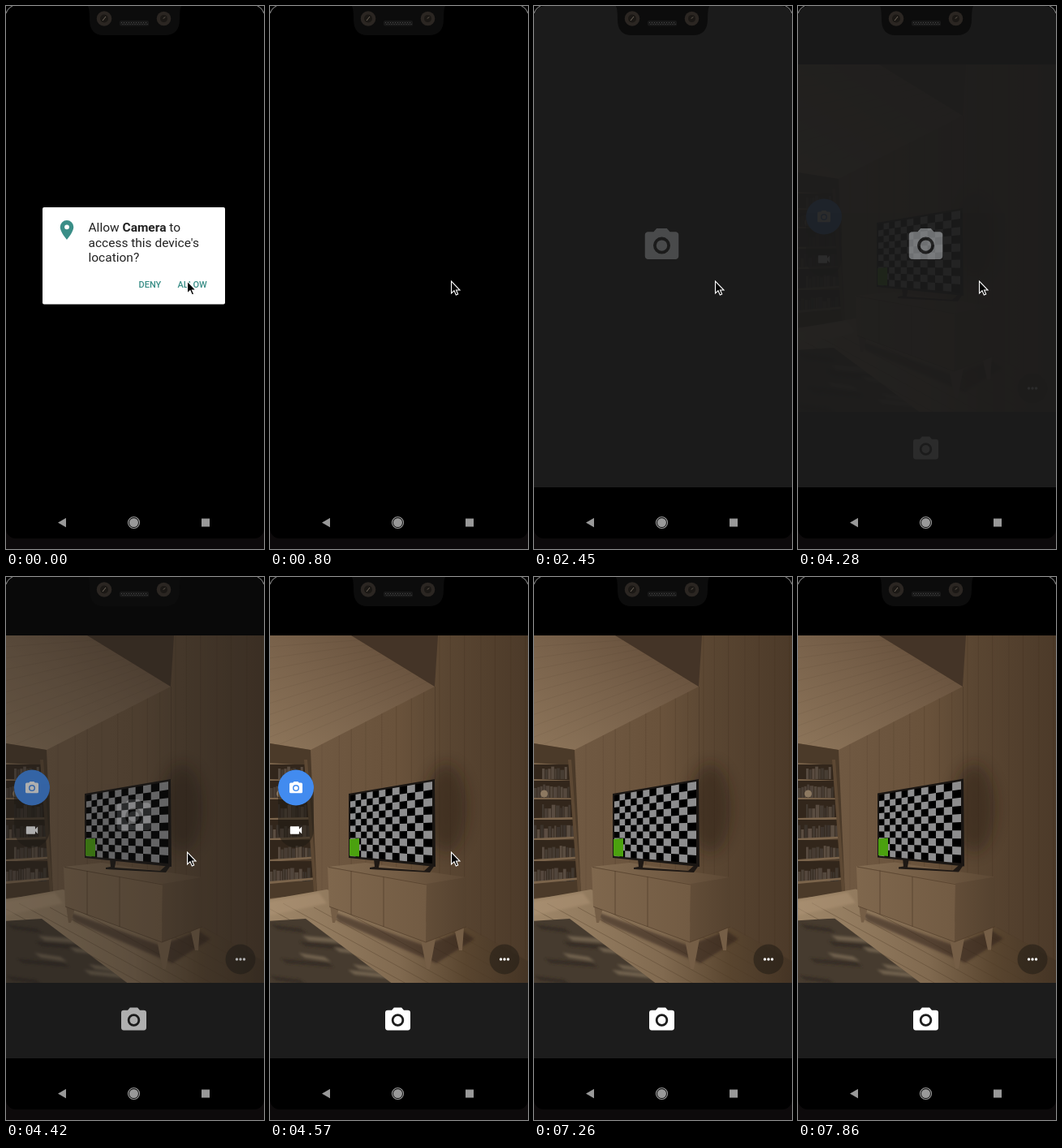
An HTML page for the animation above (8 s loop, 318 by 669 pixels).

```html
<!DOCTYPE html>
<html lang="en">
<head>
<meta charset="utf-8">
<title>Camera permission</title>
<style>
  html, body { margin: 0; width: 100%; height: 100%; overflow: hidden; background: #000; }
  svg { display: block; width: 100vw; height: 100vh; }
  text { font-family: Roboto, sans-serif; }
  .question { font-size: 15.5px; fill: #222; }
  .action { font-size: 11px; font-weight: 500; fill: #3a8e87; }
</style>
</head>
<body>
<svg viewBox="0 0 318 669">
  <defs>
    <symbol id="camera" viewBox="2 2 20 18">
      <path fill-rule="evenodd" d="M9 2 7.2 4H4a2 2 0 0 0-2 2v12a2 2 0 0 0 2 2h16a2 2 0 0 0 2-2V6a2 2 0 0 0-2-2h-3.2L15 2zM12 7a5 5 0 1 1 0 10 5 5 0 1 1 0-10z"/>
      <circle cx="12" cy="12" r="3.2"/>
    </symbol>
    <linearGradient id="wallShade">
      <stop offset=".15" stop-color="#705942"/><stop offset=".5" stop-color="#69523b"/>
      <stop offset=".68" stop-color="#5a4632"/><stop offset="1" stop-color="#4c3a29"/>
    </linearGradient>
    <linearGradient id="ceilingShade" x1="0" y1="1" x2="1" y2="0">
      <stop offset="0" stop-color="#8d755a"/><stop offset=".5" stop-color="#78614a"/><stop offset="1" stop-color="#604a37"/>
    </linearGradient>
    <linearGradient id="floorShade">
      <stop offset="0" stop-color="#a0886a"/><stop offset=".5" stop-color="#816a50"/>
      <stop offset=".75" stop-color="#59452f"/><stop offset="1" stop-color="#433324"/>
    </linearGradient>
    <linearGradient id="topShade">
      <stop offset="0" stop-color="#826b51"/><stop offset=".5" stop-color="#745d45"/><stop offset="1" stop-color="#5c4834"/>
    </linearGradient>
    <linearGradient id="frontShade">
      <stop offset="0" stop-color="#7f674d"/><stop offset="1" stop-color="#725b43"/>
    </linearGradient>
    <linearGradient id="sideShade">
      <stop offset="0" stop-color="#624d38"/><stop offset="1" stop-color="#55422f"/>
    </linearGradient>
    <filter id="soft" x="-50%" y="-50%" width="200%" height="200%"><feGaussianBlur stdDeviation="9"/></filter>
    <filter id="slightlySoft"><feGaussianBlur stdDeviation="1.500"/></filter>
    <clipPath id="preview"><rect y="72" width="318" height="428"/></clipPath>
    <clipPath id="rug"><path d="M-5 424 44 421 152 502H-5z"/></clipPath>
  </defs>

  <rect width="318" height="669"/>

  <g id="app">
    <g clip-path="url(#preview)">
      <path fill="url(#wallShade)" d="M0 72H318V500H0z"/>
      <path fill="url(#ceilingShade)" d="M0 72H100L203 135 50 213 0 205z"/>
      <path fill="#443427" d="M100 72H207L203 135z"/>
      <path stroke="#3b2c1f" opacity=".35" d="M203.500 135V250"/>
      <g id="boards" fill="none" stroke="#3b2a1b"></g>
      <path fill="#4b3a29" d="M0 205 50 213 58 392 0 402z"/>
      <g id="shelves"></g>
      <ellipse cx="217" cy="285" rx="26" ry="55" fill="#21160d" opacity=".42" filter="url(#soft)"/>
      <g id="furniture">
        <path fill="url(#floorShade)" d="M-5 398 70 385 190 425 242 432 323 476V505H-5z"/>
        <g id="planks" stroke="#4c3925" opacity=".35"></g>
        <path fill="#ad9375" opacity=".55" filter="url(#slightlySoft)" d="M-5 401 60 389 70 402-5 418z"/>
        <g clip-path="url(#rug)">
          <path fill="#463b2f" d="M-5 415H160V505H-5z"/>
          <g id="stripes" filter="url(#slightlySoft)"></g>
        </g>
        <path fill="#2a1d12" opacity=".5" filter="url(#slightlySoft)" d="M76 412 190 454 238 436 252 446 205 476 84 424z"/>
        <path fill="#755e46" d="M74 404 85 408 80 426H77zM186 447 204 446 197 483H193zM228 437 239 432 237 460H233z"/>
        <path fill="url(#topShade)" d="M72 357 118 352 242 370 193 379z"/>
        <path fill="url(#frontShade)" d="M71 357 193 378 192 450 73 406z"/>
        <path fill="url(#sideShade)" d="M193 378 242 370V431L192 450z"/>
        <path fill="none" stroke="#4b3826" stroke-opacity=".6" d="M100 362V416M140 369.500V431M72 357.500 193 379M73 406 192 450 242 431"/>
        <path fill="#1e1814" d="M128 347H136L134 358 190 362 199 354H204L197 364 123 360V358L129 357z"/>
        <path fill="#1a1613" d="M97 267 203 249 204 357 97 346z"/>
        <path d="M99 269 200 252V353L99 344z"/>
        <g id="checks" fill="#8d8d8e"></g>
        <path fill="#4ba10f" d="M98 323 110 322V344.500L98 343.500z"/>
      </g>
    </g>
    <rect y="500" width="318" height="93" fill="#1c1c1c"/>
    <use href="#camera" x="142" y="530" width="31" height="29" fill="#fff"/>
    <circle cx="289" cy="471" r="18.500" fill="#1d1813" opacity=".5"/>
    <g fill="#fff"><circle cx="284.500" cy="471" r="1.700"/><circle cx="289" cy="471" r="1.700"/><circle cx="293.500" cy="471" r="1.700"/></g>
    <g id="modes">
      <rect x="10" y="237.500" width="44" height="96" rx="22" fill="#1d1813" opacity=".5"/>
      <circle cx="32" cy="259.500" r="22" fill="#428bef"/>
      <use href="#camera" x="24" y="252" width="16" height="14.400" fill="#fff"/>
      <path fill="#fff" transform="translate(22.400 302.400) scale(.8)" d="M17 10.500V7a1 1 0 0 0-1-1H4a1 1 0 0 0-1 1v10a1 1 0 0 0 1 1h12a1 1 0 0 0 1-1v-3.500l4 4v-11z"/>
    </g>
  </g>

  <g id="splash">
    <rect id="sheet" width="318" fill="#1b1b1b"/>
    <use id="splashIcon" href="#camera" x="136.500" y="274" width="42" height="38" fill="#77797b"/>
  </g>

  <g id="dialog">
    <rect x="45" y="248" width="225" height="119.500" rx="2" fill="#fff"/>
    <path fill="#3a8e87" fill-rule="evenodd" d="M75 264a8.300 8.300 0 0 0-8.300 8.300C66.700 278.500 75 288 75 288s8.300-9.500 8.300-15.700A8.300 8.300 0 0 0 75 264zm0 5.400a2.900 2.900 0 1 1 0 5.800 2.900 2.900 0 1 1 0-5.800z"/>
    <text class="question" x="101.500" y="278">Allow <tspan font-weight="700">Camera</tspan> to</text>
    <text class="question" x="101.500" y="296.500">access this device's</text>
    <text class="question" x="101.500" y="315">location?</text>
    <rect id="press" x="206" y="328" width="48" height="31" rx="2" fill="#dcdcdc"/>
    <text class="action" x="163.500" y="347">DENY</text>
    <text class="action" x="211.500" y="347">ALLOW</text>
  </g>

  <g id="phone">
    <path fill="#0d0a0b" d="M0 644A12 12 0 0 0 12 656H306A12 12 0 0 0 318 644V669H0z"/>
    <path d="M0 0H14A14 14 0 0 0 0 14zM318 0H304A14 14 0 0 1 318 14z"/>
    <path fill="none" stroke="#777" stroke-width="1.300" d="M0 9Q2 3 8 0M318 9Q316 3 310 0"/>
    <path fill="#0c0c0c" d="M101 0H216Q214 4 214 16 214 36 196 36H120Q103 36 103 16 103 4 101 0z"/>
    <g fill="#2b2622"><circle cx="121" cy="15.500" r="9.300"/><circle cx="194.500" cy="15.500" r="8.800"/></g>
    <g fill="#1b1815"><circle cx="121" cy="15.500" r="5"/><circle cx="194.500" cy="15.500" r="4.500"/></g>
    <path stroke="#71685c" d="M119 18 123 13M194 15.500 196 13.500"/>
    <rect x="140" y="18" width="36" height="6.500" rx="2" fill="#191919"/>
    <path stroke="#464646" stroke-dasharray="1 2" d="M142 20.500H175M143.500 22.500H175"/>
    <g fill="#999">
      <path d="M64 636.500 74 630.800V642.200z"/>
      <circle cx="157.500" cy="636.500" r="5.500"/>
      <circle cx="157.500" cy="636.500" r="7" fill="none" stroke="#999" stroke-width="1.200"/>
      <rect x="241" y="631.500" width="10" height="10"/>
    </g>
  </g>

  <path id="cursor" stroke="#fff" stroke-width="1.100" d="M223.500 339V354L227 350.700 229.300 356 231.700 355 229.500 350H234z"/>
</svg>

<script>
const LOOP = 8000;
const HOLDS = [0, 500, 650, 800, 1550, 1700, 1850, 2450, 2600, 4280, 4420, 4570,
  5320, 5460, 5610, 5760, 5910, 7260, 7410, 7560, 7710, 7860];
const $ = id => document.getElementById(id);

let seed = 7;
const random = () => (seed = seed * 16807 % 2147483647) / 2147483647;
const mix = (a, b, t) => a + (b - a) * t;

function add(parent, d, attributes = {}) {
  const path = document.createElementNS("http://www.w3.org/2000/svg", "path");
  Object.entries({ d, ...attributes }).forEach(([name, value]) => path.setAttribute(name, value));
  $(parent).append(path);
}

function drawChecks(columns, rows) {
  // Perspective: the near right edge is a third taller than the left one.
  const point = (column, row) => {
    const u = column / columns, s = u / (u + 1.33 * (1 - u));
    return `${mix(99, 200, s)} ${mix(mix(269, 252, s), mix(344, 353, s), row / rows)}`;
  };
  let d = "";
  for (let c = 0; c < columns; c++)
    for (let r = (c + 1) % 2; r < rows; r += 2)
      d += `M${point(c, r)}L${point(c + 1, r)}L${point(c + 1, r + 1)}L${point(c, r + 1)}z`;
  add("checks", d);
}

function drawBoards() {
  for (let i = 1; i < 11; i++) {
    const s = i / 11;
    add("boards", `M0 ${mix(225, 72, s)}L${mix(203, 100, s)} ${mix(135, 72, s)}`, { opacity: .08 });
  }
  for (let x = 64; x < 318; x += 13 + random() * 9) {
    const top = x < 203 ? 213 - (x - 50) * .51 : 72;
    add("boards", `M${x} ${top}V${390 + Math.max(0, x - 70) * .34}`, { opacity: .08 + random() * .14 });
  }
  for (let i = 0; i < 9; i++)
    add("planks", `M${i * 38 - 60} ${392 + i * 5}l210 115`);
}

function drawShelves() {
  const levels = [229, 249, 272, 297, 322, 348, 375, 396];
  levels.forEach((y, i) => {
    const right = 45 + i * 1.8, end = y + 3 - i * 1.3;
    if (i > 0 && i < 7) {
      add("shelves", `M0 ${levels[i - 1] + 2}H${right - 1}V${end}L0 ${y}z`, { fill: "#32261b" });
      for (let x = i % 2 ? 10 : 0; x < right - 6;) {
        const width = 2 + random() * 3, height = 11 + random() * 6;
        const tone = 20 + random() * 11;
        add("shelves", `M${x} ${y}v${-height}h${width}v${height}z`, { fill: `hsl(28 16% ${tone}%)` });
        x += width + .6;
      }
    }
    add("shelves", `M0 ${y}L${right} ${end}v2.500L0 ${y + 3}z`, { fill: "#7b644b" });
  });
  add("shelves", "M42 225h4L58 389h-4z", { fill: "#5d4833" });
  add("shelves", "M8 267a4.500 4.500 0 1 1 9 0 4.500 4.500 0 1 1-9 0", { fill: "#8d7961" });
}

function drawStripes() {
  for (let i = 0; i < 10; i++) {
    const x = random() * 120 - 15, y = 428 + i * 7, width = 30 + random() * 35;
    add("stripes", `M${x} ${y}l${width} 5 8 6-${width} -5z`, { fill: i % 3 ? "#7d6c57" : "#31291f", opacity: .75 });
  }
}

// Linear interpolation through [time, value] pairs.
function track(t, ...keys) {
  const next = keys.findIndex(([time]) => time > t);
  if (next === 0) return keys[0][1];
  if (next < 0) return keys[keys.length - 1][1];
  const [t0, v0] = keys[next - 1], [t1, v1] = keys[next];
  return mix(v0, v1, (t - t0) / (t1 - t0));
}

const show = (id, visible) => $(id).setAttribute("visibility", visible ? "visible" : "hidden");
const move = (id, x, y) => $(id).setAttribute("transform", `translate(${x} ${y})`);

function render(now) {
  const clock = now % LOOP;
  const t = HOLDS.findLast(time => time <= clock);

  show("press", t >= 500);
  move("dialog", 0, track(t, [500, 0], [650, 10.5]));
  $("dialog").setAttribute("opacity", track(t, [500, 1], [650, .5], [800, 0]));

  const top = track(t, [1550, 174], [1700, 1], [1850, 0]);
  const bottom = track(t, [1550, 618], [1700, 596], [1850, 593]);
  $("sheet").setAttribute("y", top);
  $("sheet").setAttribute("height", bottom - top);
  $("splashIcon").setAttribute("opacity", track(t, [1850, 0], [2450, .5], [2600, 1]));
  $("splash").setAttribute("opacity", track(t, [2600, 1], [4280, .93], [4420, .35], [4570, 0]));
  show("splash", t >= 1550);
  show("app", t >= 4280);

  move("modes", track(t, [4570, 0], [5320, -2.5], [5460, -11], [5610, -37], [5760, -49], [5910, -60]), 0);
  const sway = track(t, [7260, 0], [7860, 1]);
  move("furniture", sway, -.4 * sway);
  show("cursor", t < 7260);
}

drawChecks(12, 10);
drawBoards();
drawShelves();
drawStripes();

(function tick() {
  render(performance.now());
  requestAnimationFrame(tick);
})();
</script>
</body>
</html>
```
